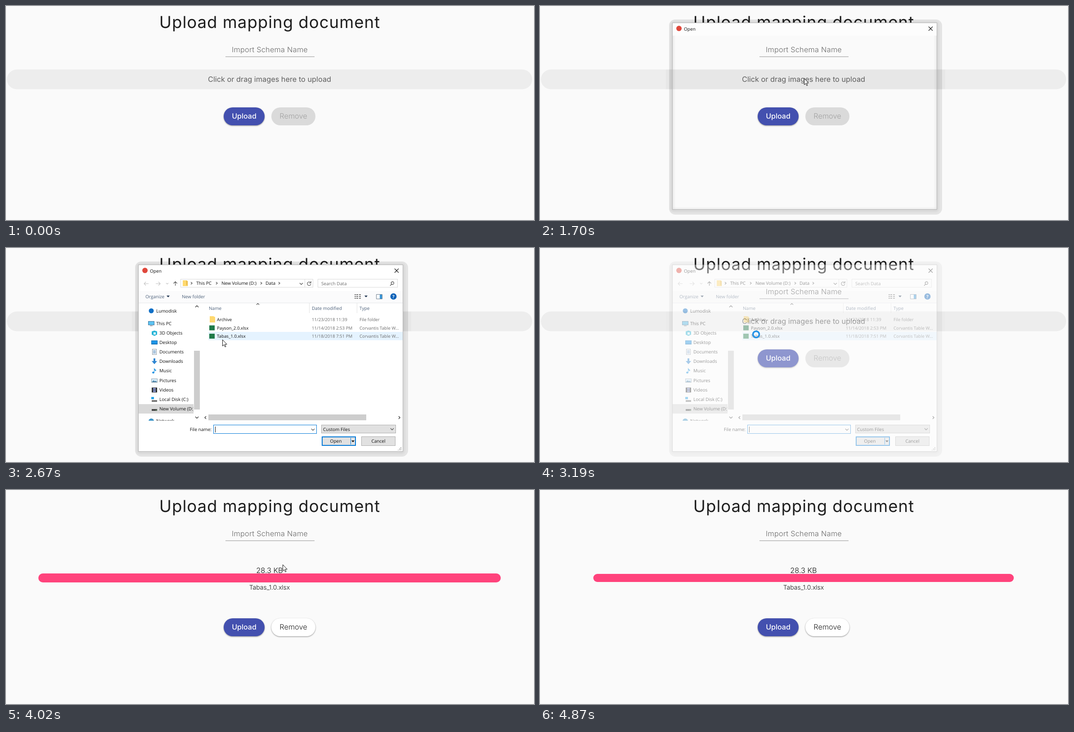
Write an HTML page that moves like this. It is 1174 px wide and 477 px high and loops after 6120 ms.

```html
<!DOCTYPE html>
<html lang="en">
<head>
<meta charset="utf-8">
<title>Upload mapping document</title>
<style>
  html, body { margin: 0; width: 100%; height: 100%; overflow: hidden; background: #fafafa; }
  svg { display: block; }
  text { text-rendering: geometricPrecision; }
  #page text { font: 300 16.3px Inter, sans-serif; text-anchor: middle; }
  #page .title { font: 400 36.6px Inter, sans-serif; letter-spacing: 1px; fill: #1f1f1f; }
  #page .label { font-size: 16px; font-weight: 500; fill: #fff; }
  #page .size { fill: #111; }
  #page .file { font-size: 14px; fill: #111; }
  .raised { filter: drop-shadow(0 1px 1px rgba(0,0,0,.25)) drop-shadow(0 1px 1.5px rgba(0,0,0,.2)); }
  #dialog text { font: 10.1px "Open Sans", "Noto Sans", sans-serif; fill: #111; }
  #dialog .blue { fill: #4c607a; }
  #dialog .grey { fill: #6d6d6d; }
  #dialog .date { font-size: 9.7px; }
  #dialog .mid { text-anchor: middle; }
  #frame { filter: drop-shadow(0 1px 3px rgba(0,0,0,.45)); }
  .line { fill: none; stroke: #444; stroke-width: 1.1; }
  .faint { fill: none; stroke: #c4c4c4; stroke-width: 1.1; }
  .box { fill: #fff; stroke: #d9d9d9; }
  .button { fill: #e1e1e1; stroke: #adadad; }
  .thumb { fill: #cdcdcd; }
  #cursor path { fill: #fff; stroke: #111; stroke-width: 1; stroke-linejoin: round; }
</style>
</head>
<body>
<svg width="1174" height="477" viewBox="0 0 1174 477">
  <g id="page">
    <text class="title" x="586.5" y="49">Upload mapping document</text>
    <text x="586.5" y="103" fill="#666" letter-spacing=".25">Import Schema Name</text>
    <path d="M488 113H686" stroke="#8f8f8f"/>
    <g id="drop">
      <rect x="2" y="141.5" width="1168" height="44" rx="22" fill="#ededed"/>
      <text x="586" y="169" style="font-weight:400" fill="#5f5f5f">Click or drag images here to upload</text>
    </g>
    <g id="preview">
      <text class="size" x="586" y="185">28.3 KB</text>
      <rect id="bar" fill="#ff437c"/>
      <text class="file" x="586" y="222">Tabas_1.0.xlsx</text>
    </g>
    <g id="buttons">
      <rect class="raised" x="484" y="226" width="91" height="40" rx="20" fill="#4350af"/>
      <text class="label" x="529.5" y="251">Upload</text>
      <rect id="remove" x="590" y="226" width="98" height="40" rx="20"/>
      <text id="removeText" x="639" y="251">Remove</text>
    </g>
  </g>

  <g id="dialog">
    <rect x="280" y="141.5" width="621" height="44" fill="#000" opacity=".025"/>
    <path d="M301 30H880a14 14 0 0 1 14 14V451a14 14 0 0 1-14 14H301a14 14 0 0 1-14-14V44a14 14 0 0 1 14-14ZM295 38V453H882V38Z"
      fill="#000" fill-opacity=".09" fill-rule="evenodd"/>
    <path id="frame" d="M294 37H883V454H294ZM295 38V453H882V38Z" fill="#b4b4b4" fill-rule="evenodd"/>
    <path d="M295 38H882V66H295Z" fill="#fdfdfd"/>
    <g id="body">
      <path d="M295 38H882V453H295Z" fill="#fff"/>
      <path d="M295 96H882V122H295Z" fill="#fbfbfc"/>
      <path d="M295 122.5H882" stroke="#e4e6e9"/>
      <path class="faint" d="M317 79.5H307m4-4-4 4 4 4M333 79.5h10m-4-4 4 4-4 4M356 78l2.5 2.5L361 78"/>
      <path class="line" d="M376.5 84V75m-4 4 4-4 4 4"/>
      <rect class="box" x="388.5" y="69.5" width="294" height="18"/>
      <path d="M664.5 70V87" stroke="#d9d9d9"/>
      <path d="M393 72h8l3 2v11h-11Z" fill="#ffd970"/>
      <path d="M401 72v10l3 3V74Z" fill="#e9bb48"/>
      <path class="line" d="M411 76l3 2.5-3 2.5M467 76l3 2.5-3 2.5M566 76l3 2.5-3 2.5M606 76l3 2.5-3 2.5M653 78l3.5 3.5 3.5-3.5"/>
      <path class="line" d="M677 77a4 4 0 1 0 .8 3.5M678 74v4h-4"/>
      <text x="423" y="82">This PC</text>
      <text x="479" y="82">New Volume (D:)</text>
      <text x="577" y="82">Data</text>
      <rect class="box" x="693.5" y="69.5" width="177" height="18"/>
      <text class="grey" x="701" y="83">Search Data</text>
      <path class="line" d="M854 84l3.5-3.5m-.2-.2a3 3 0 1 1 4.3-4.3 3 3 0 0 1-4.3 4.3"/>
      <text class="blue" x="310" y="112">Organize</text>
      <text class="blue" x="391" y="112">New folder</text>
      <path d="M357 106h7l-3.5 4ZM797 106h7l-3.5 4Z" fill="#1f3550"/>
      <path d="M775 104h3m1 0h4m2 0h4M775 108h3m1 0h4m2 0h4M775 112h3m1 0h4m2 0h4" stroke="#777" stroke-width="2"/>
      <path d="M823.5 103.5h13v10h-13Z" fill="#fff" stroke="#6d7d8d"/>
      <path d="M831 104h5v9h-5Z" fill="#3b97d9"/>
      <circle cx="861.5" cy="108" r="7" fill="#0b62b8"/>
      <text class="mid" x="861.5" y="112" style="fill:#fff;font-weight:700">?</text>

      <text x="457" y="408" text-anchor="end">File name:</text>
      <rect x="461.5" y="394.5" width="229" height="19" fill="#fff" stroke="#0078d7"/>
      <path d="M465.5 398V411" stroke="#111"/>
      <rect class="button" x="701.5" y="394.5" width="165" height="18"/>
      <text x="705" y="408">Custom Files</text>
      <path class="line" d="M679 403l3.5 3.5 3.5-3.5M855 402l3.5 3.5 3.5-3.5"/>
      <rect x="703" y="421" width="74" height="19" fill="#e1e1e1" stroke="#0078d7" stroke-width="2"/>
      <text class="mid" x="733.5" y="434">Open</text>
      <path d="M766.5 423V438" stroke="#0078d7"/>
      <path d="M768 429h7l-3.5 4Z" fill="#111"/>
      <rect class="button" x="790.5" y="420.5" width="75" height="20"/>
      <text class="mid" x="828" y="434">Cancel</text>
      <path d="M878 444v7M875 447v4M872 450v1" stroke="#aaa" stroke-width="2" stroke-dasharray="2 1"/>
    </g>
    <g id="lists">
      <svg x="295" y="123" width="122" height="262" viewBox="295 123 122 262">
        <path d="M295 348H417V369H295Z" fill="#d9d9d9"/>
        <g id="nav"></g>
      </svg>
      <path class="thumb" d="M418 229H431V360H418ZM450 371H801V384H450Z"/>
      <path class="line" d="M421 132l3.5-3.5 3.5 3.5M421 376l3.5 3.5 3.5-3.5M445 375l-3 3 3 3M873 375l3 3-3 3" style="stroke-width:1.5"/>
      <path d="M674.5 123V145M780.5 123V145" stroke="#e2e2e2"/>
      <path class="line" d="M557 126.5l3-3 3 3"/>
      <text class="blue" x="451" y="138">Name</text>
      <text class="blue" x="680" y="138">Date modified</text>
      <text class="blue" x="786" y="138">Type</text>
      <rect id="hover" x="450" width="432" height="18.5" fill="#e5f3ff"/>
      <g id="rows"></g>
    </g>
    <circle cx="309" cy="50" r="6" fill="#e0483c"/>
    <text x="320" y="54.5">Open</text>
    <path class="line" d="M864 46l9 9M873 46l-9 9" style="stroke:#111"/>
  </g>

  <g id="cursor">
    <path id="arrow" d="M.5.5V14.5L3.7 11.5 6 16.6 8 15.7 5.8 10.7H10.2Z"/>
    <g id="hand" transform="translate(-5 -1)">
      <path d="M4.5 13V2.4a1.6 1.6 0 0 1 3.2 0V9a1.4 1.4 0 0 1 2.7.4 1.4 1.4 0 0 1 2.6.6 1.3 1.3 0 0 1 2.5.8V15q0 2.5-1.5 4v2H6v-1.7L1.2 13.4q-.8-1.6.6-2.2 1.2-.3 2.7 1.8Z"/>
      <path d="M7.7 9v3.5M10.4 9.5V13M13 10.2v3"/>
    </g>
    <circle id="busy" r="7" fill="none" stroke="#2492e6" stroke-width="3.6"/>
  </g>
</svg>
<script>
const LOOP = 6120;
const $ = id => document.getElementById(id);
const set = (id, attrs) => { for (const k in attrs) $(id).setAttribute(k, attrs[k]); };
const show = (id, on) => { $(id).style.display = on ? '' : 'none'; };
const shape = (d, fill) => `<path d="${d}" fill="${fill}"/>`;

// Folder tree: label, baseline, icon in a 14 x 13 box
const nav = [
  ['Lumodisk', 144, '<circle cx="7" cy="6" r="5.5" fill="#0f6fc6"/>'],
  ['This PC', 172, shape('M0 1h14v9H0Z', '#45779c') + shape('M1 2h12v7H1Z', '#5cc3f2') + shape('M4 11h6v1H4Z', '#567')],
  ['3D Objects', 193, shape('M1 3l6-2 6 2v7l-6 3-6-3Z', '#27b4d6') + shape('M5 5h5v5H5Z', '#d9f5fb')],
  ['Desktop', 214, shape('M0 2h14v9H0Z', '#1272b8') + shape('M1 3h12v6H1Z', '#1e96e8')],
  ['Documents', 235, shape('M2 0h10v13H2Z', '#8b98a5') + shape('M3 1h8v11H3Z', '#fff') + shape('M4 3h6v1H4ZM4 5h6v1H4ZM4 7h6v1H4ZM4 9h6v1H4Z', '#5b8fbf')],
  ['Downloads', 256, shape('M5 0h4v6h4l-6 7-6-7h4Z', '#2f86d2')],
  ['Music', 277, shape('M6 0q1 3 5 5-1 3-2 3 0-2-2-3v6a2.5 2 0 1 1-1-2Z', '#1c93e3')],
  ['Pictures', 299, shape('M0 2h14v9H0Z', '#9aa5ae') + shape('M1 3h12v7H1Z', '#d5ecfa') + shape('M1 10l4-4 3 2 2-1 3 3Z', '#4d84a8')],
  ['Videos', 320, shape('M1 1h12v11H1Z', '#333') + shape('M4 2h6v4H4ZM4 7h6v4H4Z', '#8290c8')],
  ['Local Disk (C:)', 341, shape('M1 8h12v4H1Z', '#777') + shape('M0 1h6v5H0Z', '#25a3e6')],
  ['New Volume (D:)', 362, shape('M1 7h12v4H1Z', '#444') + shape('M10 9h2v1h-2Z', '#7fe07f')],
  ['Network', 389, '<circle cx="7" cy="7" r="6" fill="#3d95c8"/>' + shape('M0 8h6v5H0Z', '#4c7387')]
];
$('nav').innerHTML = nav.map(([label, y, icon], i) => {
  const x = i < 2 || i > 10 ? 316 : 323;
  return `<g transform="translate(${x} ${y - 10})">${icon}<text x="18" y="10">${label}</text></g>`;
}).join('');

const files = [
  ['Archive', '11/23/2018 11:39', 'File folder', '#ffd970'],
  ['Payson_2.0.xlsx', '11/14/2018 2:53 PM', 'Corvantis Table W...', '#1f7a48'],
  ['Tabas_1.0.xlsx', '11/18/2018 7:51 PM', 'Corvantis Table W...', '#1f7a48']
];
$('rows').innerHTML = files.map(([name, date, type, color], i) => `
  <g transform="translate(0 ${163 + i * 18.5})">
    ${shape(i ? 'M452 -9h12v11h-12Z' : 'M453 -11h8l4 2v12h-12Z', color)}
    <text class="date" x="469">${name}</text>
    <text class="grey date" x="680">${date}</text>
    <text class="grey date" x="786">${type}</text>
  </g>`).join('');

// Pointer stops: time, x, y; each is held until the next one
const stops = [
  [720, 556, 166], [1020, 572, 164], [1095, 599, 162], [1170, 586, 162], [1490, 587, 161],
  [2220, 545, 170], [2290, 510, 190], [2360, 490, 203], [2430, 482, 205], [2670, 481, 204],
  [2820, 481, 202], [2895, 480, 200], [2970, 480, 197], [3140, 480.5, 192.5],
  [3770, 484, 186], [3850, 515, 160], [3920, 560, 147], [3980, 600, 155], [4020, 615, 166],
  [4070, 645, 190], [4140, 680, 224], [4210, 715, 265], [4290, 750, 300], [4360, 783, 335],
  [4430, 848, 379], [4510, 955, 412], [4590, 1060, 439], [4810, 1118, 463]
];

function pointer(t) {
  if (t < 720) {
    const k = 1 - (1 - Math.min(8, Math.floor((t - 60) / 72.5)) / 8) ** 1.5;
    const curve = (a, b, c) => a * (1 - k) ** 2 + 2 * b * k * (1 - k) + c * k * k;
    return [curve(1096, 1020, 557), curve(464, 150, 166)].map(Math.round);
  }
  return stops.filter(s => s[0] <= t).pop().slice(1);
}

const clamp = v => Math.max(0, Math.min(1, v));
const ease = v => v < .5 ? 2 * v * v : 1 - 2 * (1 - v) ** 2;
const ramp = (t, from, to) => ease(clamp((t - from) / (to - from)));

function draw(t) {
  const uploaded = t >= 3290;
  show('drop', !uploaded);
  show('preview', uploaded);
  set('buttons', { transform: `translate(0 ${uploaded ? 60 : 0})` });

  const pulse = 1 + .1 * (ramp(t, 3370, 3930) - ramp(t, 4000, 4480));
  const w = 935 * pulse, h = 18 * pulse;
  set('bar', { x: 586 - w / 2, y: 196 - h / 2, width: w, height: h, rx: h / 2 });

  const lit = uploaded ? clamp((t - 3360) / 300) : 0;
  const shade = Math.round(218 + 37 * lit);
  set('remove', { fill: `rgb(${shade},${shade},${shade})` });
  $('remove').style.filter = uploaded
    ? `drop-shadow(0 1px 1px rgba(0,0,0,${.25 * lit})) drop-shadow(0 1px 1.5px rgba(0,0,0,${.2 * lit}))`
    : 'none';
  set('removeText', { fill: uploaded ? '#222' : '#a0a0a0' });

  show('dialog', t >= 1700 && t < 3210);
  set('dialog', { opacity: t < 3140 ? 1 : .4 });
  show('body', t >= 1770);
  show('lists', t >= 1840);

  const visible = t >= 60 && t < 4870;
  show('cursor', visible);
  if (!visible) return;
  const [x, y] = pointer(t);
  const hand = t < 1490 && y > 141 && y < 186;
  const busy = t >= 3140 && t < 3730;
  set('cursor', { transform: `translate(${x} ${y})` });
  show('hand', hand);
  show('busy', busy);
  show('arrow', !hand && !busy);
  set('hover', { y: 150 + 18.5 * Math.max(0, Math.min(2, Math.floor((y - 150) / 18.5))) });
}

const start = performance.now();
function tick() {
  draw((performance.now() - start) % LOOP);
  requestAnimationFrame(tick);
}
tick();
</script>
</body>
</html>
```
